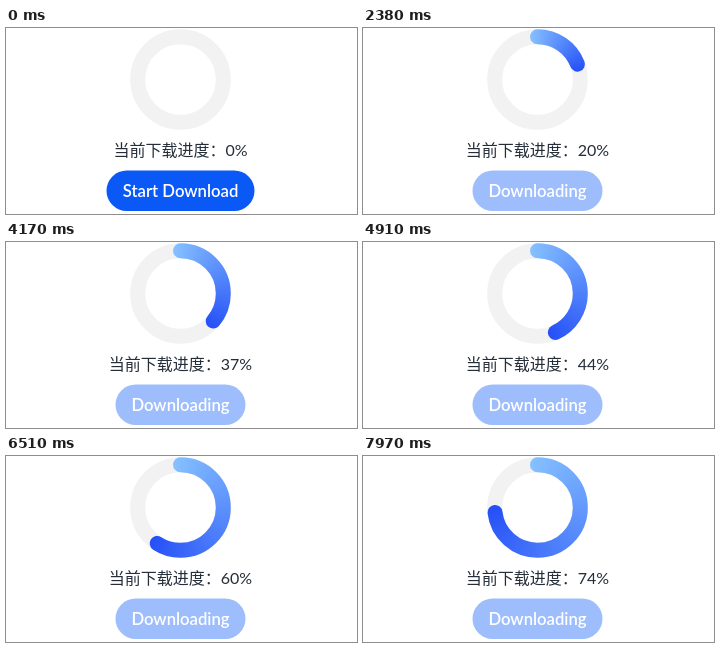
An HTML page with a canvas that plays this animation: 351 by 186 pixels, repeating every 8 s.

```html
<!DOCTYPE html>
<html lang="zh-CN">
<head>
<meta charset="utf-8">
<title>下载进度</title>
<style>
html, body { margin: 0; width: 100%; height: 100%; overflow: hidden; background: #fff; }
canvas { display: block; width: 351px; height: 186px; }
</style>
</head>
<body>
<canvas id="stage"></canvas>
<script>
const W = 351, H = 186, LOOP = 8000;
const START = 330, ORIGIN = 325, STEP = 102;
const HOLDS = [[1000, 1150], [4170, 4370], [7140, 7340]];
const CX = 174.5, CY = 51.5, R = 42.8, LINE = 15;
const LIGHT = '#86c1ff', DARK = '#254ff7';
const FONT = 'Lato, "Noto Sans CJK SC", sans-serif';

const canvas = document.getElementById('stage');
const ctx = canvas.getContext('2d');
const dpr = window.devicePixelRatio || 1;
canvas.width = W * dpr;
canvas.height = H * dpr;

function drawRing(part) {
  ctx.lineWidth = LINE;
  ctx.strokeStyle = '#f2f2f2';
  ctx.beginPath();
  ctx.arc(CX, CY, R, 0, Math.PI * 2);
  ctx.stroke();
  if (part <= 0) return;

  // The gradient spans the arc together with both round caps.
  const top = -Math.PI / 2, cap = LINE / 2 / R, length = part * Math.PI * 2;
  const sweep = ctx.createConicGradient(top - cap, CX, CY);
  sweep.addColorStop(0, LIGHT);
  sweep.addColorStop((length + 2 * cap) / (Math.PI * 2), DARK);
  ctx.strokeStyle = sweep;
  ctx.lineCap = 'round';
  ctx.beginPath();
  ctx.arc(CX, CY, R, top, top + length);
  ctx.stroke();
}

function drawText(text, y, color, font) {
  ctx.font = `${font} ${FONT}`;
  ctx.fillStyle = color;
  ctx.textAlign = 'center';
  ctx.fillText(text, CX, y);
}

function drawButton(label, width, color) {
  ctx.fillStyle = color;
  ctx.beginPath();
  ctx.roundRect(CX - width / 2, 142.5, width, 40.5, 20.25);
  ctx.fill();
  drawText(label, 168.7, '#fff', '600 16.7px');
}

function draw(t) {
  const hold = HOLDS.find(([from, to]) => t >= from && t < to);
  if (hold) t = hold[0];
  const busy = t >= START;
  const percent = busy ? Math.floor((t - ORIGIN) / STEP) : 0;

  ctx.setTransform(dpr, 0, 0, dpr, 0, 0);
  ctx.fillStyle = '#fff';
  ctx.fillRect(0, 0, W, H);
  drawRing((percent - 0.85) / 100);
  drawText(`当前下载进度：${percent}%`, 128.3, '#242d38', '400 16px');
  if (busy) drawButton('Downloading', 130, '#9dbdfc');
  else drawButton('Start Download', 148, '#0a59f7');
}

function tick(now) {
  draw(now % LOOP);
  requestAnimationFrame(tick);
}
requestAnimationFrame(tick);
</script>
</body>
</html>
```
